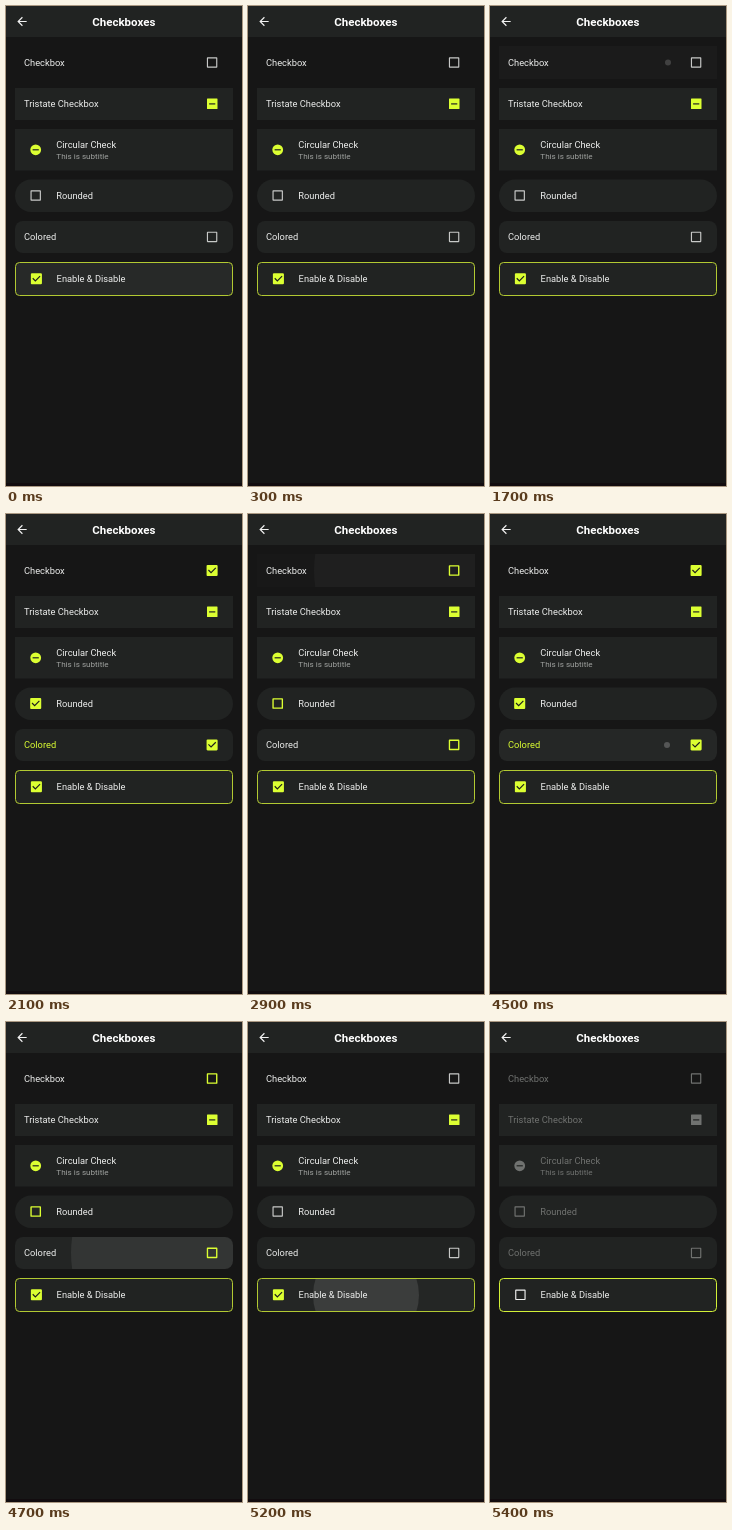
Write an HTML page that moves like this. It is 236x480 px and loops after 6.5 s.

```html
<!DOCTYPE html>
<html lang="en">
<head>
<meta charset="utf-8">
<title>Checkboxes</title>
<style>
  html, body { margin: 0; width: 100%; height: 100%; overflow: hidden; background: #161616; }
  svg { display: block; width: 100%; height: 100%; }
  text { font: 9.3px Roboto, sans-serif; }
</style>
</head>
<body>
<svg id="stage" viewBox="0 0 236 480"></svg>
<script>
const LOOP = 6500, STEP = 100;
const BG = '#161616', TILE = '#212322', LIME = '#dcff32';
const LIGHT = [238, 239, 238], OUTLINE = [200, 201, 200], SUB = [158, 160, 158];
const ACCENT = [220, 255, 50], DIM = [112, 114, 112];
const stage = document.getElementById('stage');

function add(parent, tag, attrs, label) {
  const node = document.createElementNS('http://www.w3.org/2000/svg', tag);
  set(node, attrs);
  if (label) node.textContent = label;
  parent.appendChild(node);
  return node;
}
function set(node, attrs) {
  for (const key in attrs) node.setAttribute(key, attrs[key]);
}
const clamp = v => Math.max(0, Math.min(1, v));
const mix = (a, b, k) => `rgb(${a.map((v, i) => Math.round(v + (b[i] - v) * k))})`;

add(stage, 'rect', { width: 236, height: 480, fill: BG });
add(stage, 'rect', { width: 236, height: 31, fill: TILE });
add(stage, 'rect', { y: 477, width: 236, height: 3, fill: '#120c0f' });
add(stage, 'path', {
  d: 'M20 11H7.83l5.59-5.59L12 4l-8 8 8 8 1.41-1.41L7.83 13H20z',
  transform: 'translate(9 8.5) scale(.583)', fill: '#f2f2f2'
});
add(stage, 'text', {
  x: 117.8, y: 19.6, fill: '#fff', 'text-anchor': 'middle',
  style: 'font-size:11.5px;font-weight:700'
}, 'Checkboxes');

const defs = add(stage, 'defs', {});

function makeTile(id, y, height, radius, fill) {
  const shape = { x: 9, y, width: 218, height, rx: radius };
  add(stage, 'rect', { ...shape, fill });
  const clip = add(defs, 'clipPath', { id });
  add(clip, 'rect', shape);
  const ink = add(stage, 'g', { 'clip-path': `url(#${id})`, fill: '#fff' });
  return {
    glow: add(ink, 'rect', { ...shape, opacity: 0 }),
    ripple: add(ink, 'circle', { cy: y + height / 2, opacity: 0 })
  };
}
const tiles = {
  plain: makeTile('plain', 40, 33, 0, BG),
  tristate: makeTile('tristate', 82, 32, 0, TILE),
  circular: makeTile('circular', 123, 41.5, 0, TILE),
  rounded: makeTile('rounded', 173.5, 32.5, 16.2, TILE),
  colored: makeTile('colored', 215, 32, 8, TILE),
  master: makeTile('master', 256.5, 33, 4, TILE)
};
const frame = add(stage, 'rect', {
  x: 9.5, y: 256.5, width: 217, height: 33, rx: 4, fill: 'none'
});

const label = (x, y, str, style = '') => add(stage, 'text', { x, y, style }, str);
const titles = [
  label(18, 59.8, 'Checkbox'),
  label(18, 101.2, 'Tristate Checkbox'),
  label(50.3, 141.8, 'Circular Check'),
  label(50.3, 192.9, 'Rounded')
];
const subtitle = label(50.3, 153.2, 'This is subtitle', 'font-size:8.1px');
const coloredTitle = label(18, 234.3, 'Colored');
const masterTitle = label(50.6, 276.2, 'Enable & Disable');
masterTitle.setAttribute('fill', mix(LIGHT, LIGHT, 0));

const tristate = add(stage, 'rect', { x: 201, y: 92.6, width: 10.5, height: 10.5, rx: .5 });
const round = add(stage, 'circle', { cx: 29.7, cy: 143.8, r: 5.4 });
for (const [x, y] of [[206.2, 97.9], [29.7, 143.8]])
  add(stage, 'path', { d: `M${x - 3.1} ${y}h6.2`, stroke: TILE, 'stroke-width': 1.2 });

function makeBox(cx, cy) {
  const g = add(stage, 'g', { transform: `translate(${cx - 5.25} ${cy - 5.25})` });
  return {
    square: add(g, 'rect', { x: .6, y: .6, width: 9.3, height: 9.3, rx: .2 }),
    tick: add(g, 'path', {
      d: 'M1.58 4.73L4.2 7.35L8.93 2.63', fill: 'none', stroke: '#1c1e1c',
      'stroke-width': 1.17, pathLength: 1
    })
  };
}
const boxes = [makeBox(206.1, 56.5), makeBox(29.7, 189.5), makeBox(206.1, 230.9)];
const masterBox = makeBox(30.4, 272.8);

function drawBox({ square, tick }, p, rest) {
  const full = p >= .5;
  const color = mix(rest, ACCENT, clamp(p * 4));
  set(square, { fill: full ? color : 'none', stroke: color, 'stroke-width': 1.15 + p * .6 });
  const drawn = clamp(p * 2 - 1);
  set(tick, { 'stroke-dasharray': `${drawn} 2`, opacity: drawn ? 1 : 0 });
}

const taps = [
  { tile: 'master', cx: 118, start: -300, length: 600, strength: .04, speed: .6 },
  { tile: 'plain', cx: 178, start: 1700, length: 400, strength: .17, speed: .545 },
  { tile: 'plain', cx: 178, start: 2700, length: 400, strength: .06, speed: .545 },
  { tile: 'colored', cx: 120, start: 3300, length: 600, strength: .11, speed: .293 },
  { tile: 'colored', cx: 177, start: 4500, length: 300, strength: .22, speed: .545 },
  { tile: 'master', cx: 118, start: 5100, length: 300, strength: .16, speed: .5 }
];

const turnOn = (t, start) => t <= start ? 0 : clamp((t - start + 10) / 200);
const turnOff = (t, start) => t <= start ? 1 : 1 - clamp((t - start + 30) / 200);

function checkProgress(t) {
  if (t < 2800) return turnOn(t, 1800);
  if (t < 3500) return turnOff(t, 2800);
  if (t < 4600) return turnOn(t, 3500);
  return turnOff(t, 4600);
}

function drawRipples(t) {
  for (const { glow, ripple } of Object.values(tiles)) {
    set(glow, { opacity: 0 });
    set(ripple, { opacity: 0 });
  }
  for (const { tile, cx, start, length, strength, speed } of taps) {
    const age = t - start;
    if (age < 0 || age >= length) continue;
    const fade = 1 - age / length;
    set(tiles[tile].glow, { opacity: .018 * fade });
    set(tiles[tile].ripple, { cx, r: 3 + speed * age, opacity: strength * fade });
  }
}

function render(t) {
  const p = checkProgress(t);
  const dim = clamp((t - 5200) / 200);
  drawRipples(t);
  for (const title of titles) set(title, { fill: mix(LIGHT, DIM, dim) });
  set(subtitle, { fill: mix(SUB, DIM, dim) });
  set(coloredTitle, { fill: p > .5 ? LIME : mix(LIGHT, DIM, dim) });
  for (const shape of [tristate, round]) set(shape, { fill: mix(ACCENT, DIM, dim) });
  for (const box of boxes) drawBox(box, p, dim > .5 ? DIM : OUTLINE);
  drawBox(masterBox, turnOff(t, 5200), LIGHT);
  set(frame, { stroke: mix([178, 201, 50], [210, 240, 55], dim) });
}

function tick() {
  const t = performance.now() % LOOP;
  render(Math.floor(t / STEP) * STEP);
  requestAnimationFrame(tick);
}
tick();
</script>
</body>
</html>
```
